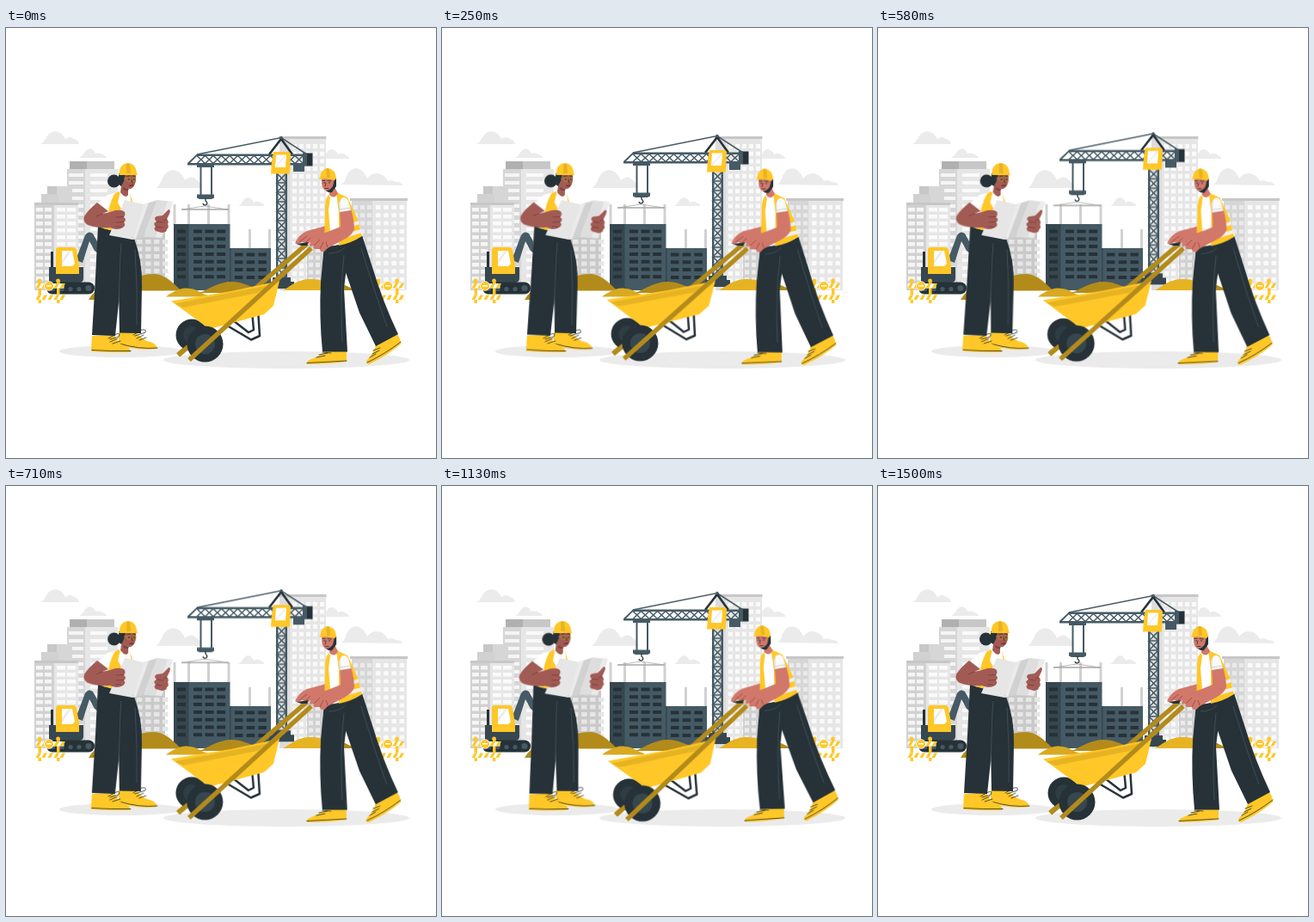
An HTML page for the animation above (1.54 s loop, 500x500 px).

```html
<!DOCTYPE html>
<html lang="en">
<head>
<meta charset="utf-8">
<title>Construction site</title>
<style>
html, body { margin: 0; width: 100%; height: 100%; overflow: hidden; background: #fff; }
svg { display: block; width: 100vw; height: 100vh; }
#woman { transform-origin: 141px 267px; }
#man { transform-origin: 326px 278px; }
.y { fill: #ffc727; }
.g { fill: #b38b1b; }
.o { fill: #e6b323; }
.k { fill: #263238; }
.s { fill: #455a64; }
.w { fill: #fff; }
.l { fill: none; stroke: #263238; stroke-width: .8; stroke-linecap: round; stroke-linejoin: round; }
.fem { fill: #a25b54; }
.mal { fill: #d1786a; }
</style>
</head>
<body>
<svg viewBox="0 0 500 500">
  <g id="clouds" fill="#ebebeb">
    <path d="M40 135Q44 133 46 129C51 118 63 117 69 129Q75 125 79 129Q84 130 85 135Z"/>
    <path d="M85 151Q89 149 91 145C95 139 101 139 104 146Q108 144 112 147Q116 148 117 151Z"/>
    <path d="M174 186Q178 184 181 177C187 162 201 161 208 177Q216 170 222 177Q227 180 228 186Z"/>
    <path d="M369 152Q371 149 373 145C376 139 383 140 386 147Q391 144 395 148Q399 149 399 152Z"/>
    <path d="M389 182Q393 181 395 175C400 159 414 160 420 175C426 166 438 167 444 178Q449 176 453 179Q460 179 461 183Z"/>
    <path d="M270 207Q273 206 275 202C278 196 285 195 288 203Q292 200 296 203Q300 204 300 207Z"/>
  </g>
  <g id="city"></g>
  <g id="tower"></g>
  <g id="crane">
    <path d="M222 147L320 127.500L350 147" fill="none" stroke="#455a64" stroke-width="1.500"/>
    <path d="M306 147L320 129L333 147" fill="none" stroke="#263238" stroke-width="2.600"/>
    <circle class="s" cx="320" cy="127.500" r="1.800"/>
    <path id="truss" fill="none" stroke="#455a64" stroke-width="1.500"/>
    <path class="s" d="M222 146.500H346V149H222L214 157H346V159.500H211V157ZM314 168H316.500V291H314ZM324.500 168H327V291H324.500Z"/>
    <path class="k" d="M345 145.500H356.500V160.500H345Z"/>
    <path class="s" d="M334 159H347V167H334ZM345 145.500H350V160H345Z"/>
    <path class="y" d="M311 144H329L331 146L330 169.500H308L309 155Z"/>
    <path class="w" d="M314 147.500H326L325 162H313Z"/>
    <path d="M314 160L324 148.500H326L314 162Z" fill="#ebebeb"/>
    <path class="s" d="M222 159H242V162H222ZM225.500 161H227.500V194H225.500ZM238 161H240V194H238ZM222 193.500H242V197.500L239 199H225L222 197.500Z"/>
    <path d="M232 198V201Q235 203 233 205.500Q230 207 229 204" fill="none" stroke="#263238" stroke-width="1.300"/>
    <path d="M205 211L231 207L258 211" fill="none" stroke="#a6a6a6" stroke-width=".8"/>
    <path d="M204 211H259" stroke="#a6a6a6" stroke-width="1.700"/>
    <path d="M310 290H331V295H335V303H306V295H310Z" fill="#37474f"/>
  </g>
  <g id="ground">
    <path class="g" d="M96 305.500C122 305.500 148 286 172 286C188 287 196 299 204 305.500Z"/>
    <path class="g" d="M96 316Q103 304 112 303Q124 306 130 316Z"/>
    <path d="M186 312.500C194 307 203 301 213 303C222 303 227 309 235 311V312.500Z" fill="#d9a921"/>
    <path class="g" d="M225 308C240 301 251 294 264 295C277 296 288 302 303 308Z"/>
    <path d="M322 305C334 298 341 291 356 292C372 293 388 299 400 305Z" class="o"/>
    <path class="g" d="M376 305Q387 297 394 299Q400 301 404 305Z"/>
  </g>
  <g id="digger">
    <path d="M81 270L92 241Q96 235 101 239L106 248L107 262L103 259L97 248L89 273Z" fill="#455a64"/>
    <path class="k" d="M52 260H55V280H52Z"/>
    <path d="M50 278H90V291Q90 296 85 296H50Z" fill="#37474f"/>
    <rect class="k" x="47" y="295.500" width="56" height="14" rx="7"/>
    <g fill="#455a64"><circle cx="54" cy="302.500" r="3.600"/><circle cx="65" cy="303.500" r="2.600"/><circle cx="75" cy="303.500" r="2.600"/><circle cx="85" cy="303.500" r="2.600"/><circle cx="96" cy="302.500" r="3.600"/></g>
    <path class="y" d="M58 258Q58 255 61 255H78Q81 255 82 258L85 276V286H58Z"/>
    <path class="w" d="M65 259H77L80 274L77 277H65Z"/>
    <path d="M65 270L73 259H76L65 275Z" fill="#ebebeb"/>
  </g>
  <g id="fences"></g>
  <g fill="#ebebeb"><ellipse cx="134" cy="376" rx="72" ry="7"/><ellipse cx="326" cy="386" rx="143" ry="10"/></g>

  <g id="woman">
    <path class="y" d="M131 354L151 353Q157 361 164 364Q175 366 176 373Q160 375 145 372L131 368Z"/>
    <path class="l" d="M132 367Q155 374 176 372M148 357L158 351Q164 350 162 354L150 358M152 361L160 357M155 363L163 360"/>
    <path class="y" d="M100 358L126 357Q130 366 136 369Q145 371 145 377Q120 378 99 376Z"/>
    <path class="l" d="M100 374.500Q122 376 145 375.500M119 361L128 356Q134 354 131 359L121 362M121 365L130 361M124 367L133 364"/>
    <path class="k" d="M131 240L148 242Q159 270 158 300L157 355L132 354.500L131 300Z"/>
    <path class="k" d="M107 230L148 240Q141 252 135 264L131 320L127 358L100 357L104 290Z"/>
    <path d="M134 250L133 264Q132 295 131 320M150 258Q153 300 152 345" fill="none" stroke="#455a64" stroke-width=".7"/>
    <path class="w" d="M131 191L118 194Q109 201 105 207L119 217L113 233L142 240L154 204L143 190Z"/>
    <path class="y" d="M131 190L126 193Q119 207 119 217L110 232L140 240L148 205L144 192L139 199Z"/>
    <path class="w" d="M133 190L139 199L144 191L146 206L134 210L130 203Z"/>
    <circle class="k" cx="125.500" cy="178" r="7.500"/>
    <path class="fem" d="M134 170H151L151 178Q149 186 145 187L142 187L142 194Q139 199 133 191L134 184Z"/>
    <path d="M137 185Q140 188 143 187L142 189Q139 190 136 187Z" fill="#7c443e"/>
    <path class="k" d="M131 169H139L137 178L134 184L131 182Z"/>
    <g fill="none" stroke="#b38b1b" stroke-width=".8"><circle cx="142.500" cy="176" r="2.500"/><circle cx="148.800" cy="176" r="2.200"/><path d="M137 175H140"/></g>
    <circle class="k" cx="143" cy="176" r=".8"/><circle class="k" cx="148.800" cy="176" r=".8"/>
    <path class="l" d="M141 172.500L144 172M147.500 172L150 172.500M146 176L147 180"/>
    <path d="M143 183Q146 184 148 182.500" fill="none" stroke="#6d2825" stroke-width="1.100"/>
    <path class="y" d="M131.500 170Q132 158 141 157Q151 157 152 169L153 171H131Z"/>
    <path class="o" d="M140 158Q142 157 144 158L145 169H140Z"/>
    <path d="M138 200L160 205L147 246L120 241Z" fill="#e6e6e6"/>
    <path d="M160 205L176 200L160 243L147 246Z" fill="#d1d1d1"/>
    <path d="M160 205L166 203L151 245L147 246Z" fill="#ebebeb"/>
    <path d="M176 200L194 202L181 244L160 243Z" fill="#dedede"/>
    <path d="M188 201L194 202L181 244L174 243Z" fill="#ebebeb"/>
    <path class="fem" d="M106 203Q95 212 91 219Q89 225 95 229Q107 233 121 232Q129 236 136 232Q140 229 137 226Q141 223 137 220Q140 216 137 213Q131 210 121 214L112 216L119 213Z"/>
    <path d="M128 220L137 219.500M128 226L137 225.500M127 231L134 231M112 216L105 219" fill="none" stroke="#6f3935" stroke-width=".7"/>
    <path class="fem" d="M189 211Q192 211 190 216L187 222Q190 225 188 228Q190 232 187 234Q187 238 181 238L174 236Q171 233 174 231Q170 227 175 225Q171 221 175 219L182 218Z"/>
    <path d="M175 225L183 226M174 231L182 232M187 222L183 224" fill="none" stroke="#6f3935" stroke-width=".7"/>
  </g>

  <g id="man">
    <path d="M200 380L350 251" stroke="#b38b1b" stroke-width="5.500"/>
    <circle class="k" cx="216" cy="357" r="18.500"/>
    <circle cx="216" cy="357" r="10" fill="#2e3c43"/>
    <path d="M200.500 380.500L212 370.500" stroke="#b38b1b" stroke-width="5.500"/>
    <path class="l" style="stroke-width:2.500" d="M252 343L285 362.500L295 358L293 327M264 340L282 354L288 351L286 329"/>
    <path class="y" d="M192 317.500L262 306L318 294L311 323L300 333L240 349Q235 349 231 346Z"/>
    <path class="o" d="M196 320.500L304 299.500L293 308L206 325Z"/>
    <circle class="k" cx="231.500" cy="367.500" r="21"/>
    <circle cx="231.500" cy="367.500" r="11.500" fill="#37474f"/>
    <path d="M213 386L355 256" stroke="#b38b1b" stroke-width="5.500"/>
    <path class="mal" d="M372 230L350 236Q342 239 337 248Q335 252 340 251L344 249L348 250Q358 250 363 247L374 245Z"/>
    <path class="k" d="M338 251L352 249L350 253L343 253Z"/>
    <path class="y" d="M430 369L455 356Q458 360 459.500 367Q445 380 422 391Q417 390 420 386Q427 379 430 369Z"/>
    <path class="l" d="M420 389Q441 379 459 365M427 375L435 372M426 379L434 375M423 383L430 379"/>
    <path class="y" d="M371 376L396 375L396 388Q375 391 350 391Q349 387 355 385Q364 382 371 376Z"/>
    <path class="l" d="M350 389.500L396 387M364 380L374 378M361 383L371 381M368 377L378 378"/>
    <path class="k" d="M383 248L414 241L426 278Q438 318 456 356L430 370L411 331L397 290L388 264Z"/>
    <path class="k" d="M370 252L403 246Q396 274 393 303L397 376.500L368 376.500Q364 335 366 295Z"/>
    <path d="M375 262Q388 262 394 255M393 264Q388 310 391 365M413 256Q428 306 443 347" fill="none" stroke="#455a64" stroke-width=".7"/>
    <path class="w" d="M375 194L386 191L399 200L415 241Q396 253 371 254L371 205Z"/>
    <path class="y" d="M375 194Q370 200 371 215L370 250L378 250L375 212L377 197Z"/>
    <path class="y" d="M384 191L397 197Q404 211 409 223L414 242Q402 250 387 253L387 215Z"/>
    <path d="M388 232L410 224L411 228L388 236ZM388 241L413 234L414 238L388 246Z" fill="#f0f0f0"/>
    <path class="mal" d="M367 175H383L383 187L386 192Q382 200 376 194V190Q368 190 367 181Z"/>
    <path class="k" d="M382 175H384V184L379 191Q375 192 372 189Q377 189 380 184Z"/>
    <circle class="k" cx="370" cy="180" r=".8"/><circle class="k" cx="376" cy="180" r=".8"/>
    <path class="l" d="M368 177.500H371M374 177.500L378 178M372 180L371 184M371 186.500H375"/>
    <path class="y" d="M365 174Q366 164 374 163Q383 164 384 175L382 177Q373 174 364 176Z"/>
    <path class="o" d="M372 164Q374 162 376 164L377 174H373Z"/>
    <path class="mal" d="M388 211L401 210Q405 224 405 234Q402 242 391 247L374 256L370 260Q366 261 365 257L360 257Q356 257 358 253L354 254Q352 251 356 247Q363 239 374 237L389 231Z"/>
    <path d="M390 198Q395 195 398 201L401 212L388 214L387 204Z" fill="#fafafa"/>
    <path d="M387 211L401 209M388 199L388 213" fill="none" stroke="#c7c7c7" stroke-width=".8"/>
    <path d="M358 253L365 246M365 257L369 249M374 255L372 249M341 249L350 242M348 250L354 244" fill="none" stroke="#85423b" stroke-width=".7"/>
  </g>
</svg>
<script>
const $ = id => document.getElementById(id);
const NS = "http://www.w3.org/2000/svg";

function path(id, d, fill) {
  const p = document.createElementNS(NS, "path");
  p.setAttribute("d", d);
  p.setAttribute("fill", fill);
  $(id).append(p);
}
const rect = (x, y, w, h) => `M${x} ${y}h${w}v${h}h${-w}z`;
const box = (id, fill, ...r) => path(id, rect(...r), fill);

// nx by ny windows of w by h, spaced dx and dy
function grid(id, fill, x, y, w, h, dx, dy, nx, ny) {
  let d = "";
  for (let i = 0; i < nx; i++)
    for (let j = 0; j < ny; j++) d += rect(x + i * dx, y + j * dy, w, h);
  path(id, d, fill);
}

function city() {
  const b = (...a) => box("city", ...a), g = (...a) => grid("city", ...a);
  // left
  b("#e6e6e6", 71, 164, 59, 141);
  b("#d6d6d6", 71, 164, 21, 141);
  b("#b0b0b0", 74, 155, 20, 9);
  b("#c7c7c7", 94, 155, 32, 9);
  g("#f5f5f5", 73, 169, 17, 4, 0, 9, 1, 15);
  g("#fafafa", 98, 169, 20, 4, 0, 9, 1, 15);
  b("#d6d6d6", 48, 184, 29, 20);
  b("#c7c7c7", 48, 184, 11, 20);
  b("#d1d1d1", 41, 193, 20, 11);
  b("#e6e6e6", 56, 204, 28, 101);
  b("#d1d1d1", 33, 204, 23, 101);
  b("#c7c7c7", 33, 203, 51, 3);
  g("#f5f5f5", 35, 209, 8, 4.5, 10, 8, 2, 12);
  g("#fafafa", 59, 209, 10, 4.5, 12, 8, 2, 12);
  b("#c9c9c9", 148, 238, 37, 67);
  g("#e6e6e6", 152, 246, 6.5, 5, 10, 8.5, 4, 7);
  // right
  b("#e6e6e6", 318, 127, 54, 178);
  b("#dcdcdc", 318, 127, 12, 178);
  b("#c7c7c7", 317, 126, 55.5, 3);
  g("#fafafa", 333, 135, 5, 5, 8, 8.7, 5, 19);
  b("#d1d1d1", 350, 250, 22, 55);
  g("#ebebeb", 352, 256, 5, 5, 8, 8.5, 3, 5);
  b("#e6e6e6", 402, 199, 64, 106);
  b("#d6d6d6", 402, 199, 24, 106);
  b("#c7c7c7", 400, 198, 67, 3);
  g("#ebebeb", 404, 206, 5, 5, 8, 9.3, 3, 11);
  g("#fafafa", 430, 206, 5.5, 5, 9.2, 9.3, 4, 11);
}

function tower() {
  const b = (...a) => box("tower", ...a), g = (...a) => grid("tower", ...a);
  for (const x of [194.5, 211, 234, 257.5]) b("#d1d1d1", x, 205, 3, 24);
  for (const x of [282, 305]) b("#d1d1d1", x, 234, 3, 23);
  b("#455a64", 260, 256, 48, 49);
  b("#37474f", 195, 228, 18, 77);
  b("#455a64", 212.5, 228, 48, 77);
  g("#263238", 199, 234.5, 10, 4, 0, 8.8, 1, 7);
  g("#263238", 218, 234.5, 10, 4, 13.6, 8.8, 3, 7);
  g("#263238", 266, 261.5, 9.5, 4, 13.7, 8.8, 3, 4);
  b("#37474f", 260, 256, 1.5, 49);
}

function truss() {
  let d = "";
  for (let x = 222; x < 340; x += 9.5) d += `M${x} 148.500l9.500 9m0 -9l-9.500 9`;
  for (let y = 169; y < 285; y += 11) d += `M315 ${y}l11 11m0 -11l-11 11h11`;
  $("truss").setAttribute("d", d);
}

function fence(x) {
  const b = (fill, bx, ...r) => box("fences", fill, x + bx, ...r);
  for (const px of [3, 24.5]) b("#ffc727", px, 293, 3.5, 27);
  for (const py of [297, 310.5]) {
    b("#fff", 0, py, 33, 5.5);
    for (let i = 0; i < 5; i++)
      path("fences", `M${x + i * 7} ${py + 5.5}l3 -5.500h3.500l-3 5.500z`, "#ffc727");
  }
  const disc = (cx, cy, r, fill) =>
    path("fences", `M${x + cx - r} ${cy}a${r} ${r} 0 1 1 ${2 * r} 0a${r} ${r} 0 1 1 ${-2 * r} 0`, fill);
  disc(4.5, 294, 2.4, "#ffc727");
  disc(26, 294, 2.4, "#ffc727");
  disc(15.5, 300, 5.8, "#fff");
  disc(15.5, 300, 5, "#ffc727");
  b("#fff", 12.5, 299, 6, 1.5);
}

city();
tower();
truss();
fence(34.5);
fence(428.5);

// keyframes given as [ms, transform]; the last pose holds to the loop end
const LOOP = 1540;
function play(id, steps) {
  $(id).animate(steps.map(([t, transform]) => ({ offset: t / LOOP, transform })),
    { duration: LOOP, iterations: Infinity });
}
const turn = a => `rotate(${a}deg)`, lift = y => `translateY(${y}px)`;
const sway = [[0, turn(0)], [375, turn(1)], [1125, turn(-1)], [1500, turn(0)], [LOOP, turn(0)]];
play("woman", sway);
play("man", sway);
play("crane", [[0, lift(0)], [750, lift(-6)], [1500, lift(0)], [LOOP, lift(0)]]);
</script>
</body>
</html>
```
